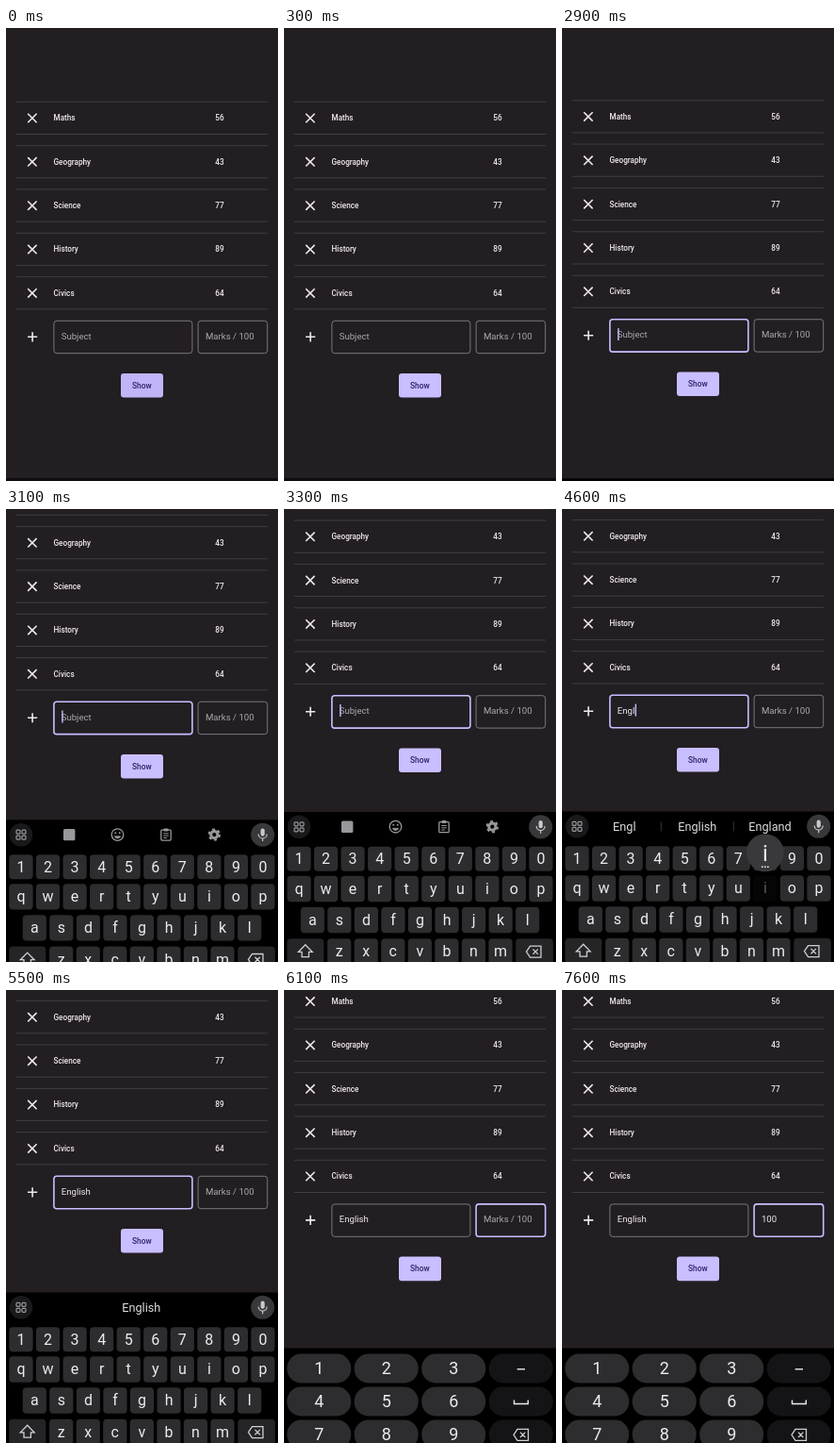
Animation, 289 px wide and 480 px high, one loop 8000 ms. Source, as an HTML page:

```html
<!DOCTYPE html>
<html lang="en">
<head>
<meta charset="utf-8">
<title>Marks entry</title>
<style>
  html, body { margin: 0; width: 100%; height: 100%; overflow: hidden; background: #221e22; }
  svg { display: block; width: 100%; height: 100%; font-family: Roboto, "Noto Sans", sans-serif; }
</style>
</head>
<body>
<svg id="stage" viewBox="0 0 289 480"></svg>
<script>
const LOOP = 8000;
const INK = '#efe9ee', HINT = '#aca6ae', ACCENT = '#c9beff', LINE = '#7c767e';
const KEY = '#2d2d2f', MOD = '#252527', ICON = '#98989b';
const NS = 'http://www.w3.org/2000/svg';
const stage = document.getElementById('stage');

function add(parent, tag, attrs, content) {
  const el = document.createElementNS(NS, tag);
  set(el, attrs);
  if (content !== undefined) el.textContent = content;
  parent.appendChild(el);
  return el;
}

function set(el, attrs) {
  for (const name in attrs) el.setAttribute(name, attrs[name]);
}

const group = parent => add(parent, 'g', {});
const show = (el, on) => set(el, { display: on ? 'inline' : 'none' });

// Text whose capitals are centred on cy
function label(parent, text, x, cy, size, attrs) {
  return add(parent, 'text', { x, y: cy + size * 0.355, 'font-size': size, fill: INK, ...attrs }, text);
}

const centred = { 'text-anchor': 'middle' };

function box(parent, x, y, width, height, rx, attrs) {
  return add(parent, 'rect', { x, y, width, height, rx, ...attrs });
}

function path(parent, d, stroke, width, attrs) {
  return add(parent, 'path', { d, stroke, 'stroke-width': width, fill: 'none', ...attrs });
}

// ---- Form ----
box(stage, 0, 0, 289, 480, 0, { fill: '#221e22' });
box(stage, 0, 477, 289, 3, 0, { fill: '#110c11' });
const form = group(stage);

const marks = [['Maths', 56], ['Geography', 43], ['Science', 77], ['History', 89], ['Civics', 64]];
marks.forEach(([name, mark], i) => {
  const y = 95.5 + i * 46.35;
  path(form, `M11 ${y - 17.2}H278M11 ${y + 17}H278`, '#413d42', 1);
  path(form, `M23.2 ${y - 4.7}l9.4 9.4m0 -9.4l-9.4 9.4`, INK, 1.6);
  label(form, name, 50.5, y, 8.2, { 'font-weight': 500 });
  label(form, mark, 227, y, 8.2, { ...centred, 'font-weight': 500 });
});
path(form, 'M23 327.3H33.2M28.1 322.2V332.4', INK, 1.6);

function makeField(x, width, hint) {
  const frame = box(form, x + 0.5, 310.3, width - 1, 34.4, 3, { fill: 'none' });
  const text = label(form, '', x + 8.3, 326.2, 9.65);
  const caret = box(form, 0, 319.6, 1.4, 13, 0, { fill: ACCENT });
  return { frame, text, caret, x: x + 8.3, hint };
}

const subject = makeField(50.4, 148, 'Subject');
const score = makeField(203.6, 74.6, 'Marks / 100');

function drawField(field, value, focused, caretOn) {
  set(field.frame, { stroke: focused ? ACCENT : LINE, 'stroke-width': focused ? 1.6 : 1 });
  field.text.textContent = value || field.hint;
  set(field.text, { fill: value ? INK : HINT });
  show(field.caret, focused && caretOn);
  const end = value ? field.text.getComputedTextLength() + 0.4 : 0.5;
  set(field.caret, { x: field.x + end });
}

box(form, 122, 366, 45, 25.6, 3, { fill: ACCENT });
const press = box(form, 122, 366, 45, 25.6, 3, { fill: '#30206a' });
label(form, 'Show', 144.4, 378.8, 8.4, { ...centred, fill: '#30206a', 'font-weight': 500 });

// ---- Letter keyboard ----
const board = group(stage);
box(board, 0, 320.5, 289, 200, 0, { fill: '#000' });
add(board, 'circle', { cx: 16, cy: 336.3, r: 12.3, fill: '#19191b' });
for (const [x, y] of [[11, 331.3], [17, 331.3], [11, 337.3], [17, 337.3]]) {
  box(board, x, y, 4, 4, 1, { fill: 'none', stroke: ICON, 'stroke-width': 1.2 });
}
add(board, 'circle', { cx: 272.7, cy: 336.3, r: 12.5, fill: '#38383a' });
box(board, 270.6, 329.6, 4.2, 8.2, 2.1, { fill: '#c8c8ca' });
path(board, 'M268.2 335.6a4.5 4.5 0 0 0 9 0M272.7 340.2V343.2', '#c8c8ca', 1.2);

const tools = group(board);
box(tools, 61, 330, 12.4, 12.4, 1.5, { fill: ICON });
add(tools, 'circle', { cx: 118.5, cy: 336.2, r: 6.3, fill: 'none', stroke: ICON, 'stroke-width': 1.3 });
path(tools, 'M115.2 337.8a3.5 3.5 0 0 0 6.6 0z', ICON, 0.6, { fill: ICON });
for (const x of [116.3, 120.7]) add(tools, 'circle', { cx: x, cy: 334.3, r: 1, fill: ICON });
box(tools, 164.8, 331.2, 10.4, 11, 1, { fill: 'none', stroke: ICON, 'stroke-width': 1.3 });
path(tools, 'M167.2 335H172.8M167.2 337.3H172.8M167.2 339.6H171', ICON, 1);
box(tools, 167.5, 329.6, 5, 3, 0.8, { fill: ICON });
add(tools, 'circle', { cx: 221.3, cy: 336.2, r: 3.6, fill: 'none', stroke: ICON, 'stroke-width': 3 });
add(tools, 'circle', { cx: 221.3, cy: 336.2, r: 5.6, fill: 'none', stroke: ICON, 'stroke-width': 2.2,
  'stroke-dasharray': '2.93 2.93' });

const bar = group(board);
const dividers = path(bar, 'M105.3 331.5V341.5M182.3 331.5V341.5', '#363638', 1);
const words = [66.3, 143.8, 221].map(x => label(bar, '', x, 336.2, 12.7, { ...centred, fill: '#dedee0' }));

const keys = {};
function keyRow(chars, shifted, x, cy, height) {
  [...chars].forEach((low, i) => {
    const cx = x + i * 28.55;
    const cap = box(board, cx - 12.6, cy - height / 2, 25.2, height, 4, { fill: KEY });
    const text = label(board, low, cx, cy - 0.3, 16, centred);
    keys[low] = { cx, cy, cap, text, low, up: shifted[i] };
  });
}
keyRow('1234567890', '!@#$%^&*()', 16, 370.3, 26);
keyRow('qwertyuiop', 'QWERTYUIOP', 16, 402, 27.4);
keyRow('asdfghjkl', 'ASDFGHJKL', 30.3, 435, 27.4);
keyRow('zxcvbnm', 'ZXCVBNM', 58.7, 468.4, 27.4);

function backspace(parent, cx, cy) {
  path(parent, `M${cx - 8} ${cy}l4 -6h11.5v12h-11.5zM${cx - 1} ${cy - 2.7}l5.4 5.4m0 -5.4l-5.4 5.4`, '#d0d0d2', 1.3);
}
const shiftCap = box(board, 3.3, 454.7, 39, 27.4, 4, { fill: MOD });
const shiftArrow = path(board, 'M22.7 461.2l7.4 7.6h-3.7v5.4h-7.4v-5.4h-3.7z', '#d0d0d2', 1.3);
box(board, 246.3, 454.7, 39.6, 27.4, 4, { fill: MOD });
backspace(board, 265.5, 468.6);

const popup = group(board);
add(popup, 'circle', { cx: 0, cy: 0, r: 20, fill: '#39393c' });
const popupText = label(popup, '', 0, 0, 24, centred);
for (const x of [-3, 0, 3]) add(popup, 'circle', { cx: x, cy: 15, r: 0.9, fill: INK });

// ---- Number pad ----
const pad = group(stage);
box(pad, 0, 379.5, 289, 101, 0, { fill: '#000' });
const padCaps = [];
for (let row = 0; row < 3; row++) {
  const cy = 401 + row * 35;
  for (let col = 0; col < 4; col++) {
    const cx = 37.2 + col * 71.5;
    padCaps.push(box(pad, cx - 34, cy - 15.5, 68, 31, 15, { fill: col < 3 ? KEY : '#141416' }));
    if (col < 3) label(pad, row * 3 + col + 1, cx, cy, 18, centred);
  }
}
path(pad, 'M247.7 401.8H256', INK, 1.4);
path(pad, 'M244.5 434.5V438.5H259.3V434.5', INK, 1.4);
backspace(pad, 252, 471.3);

// ---- Timeline ----
const FOCUS = 2900, SWITCH = 5700, SETTLED = 5800;
// key, pressed, released
const taps = [['e', 4000, 4100], ['n', 4200, 4300], ['g', 4300, 4400], ['l', 4500, 4600],
  ['i', 4600, 4700], ['s', 4800, 4900], ['h', 4900, 5000]];
const digits = [['1', 6700], ['0', 6900], ['0', 7100]];
const guesses = [[], ['E', 'Even', 'Every'], ['En', 'End', 'Enter'], ['Eng', 'English', 'England'],
  ['Engl', 'English', 'England'], ['Engli', 'English', 'England'], ['Englis', 'English', 'England'],
  ['', 'English', '']];

const decay = (t, tau) => Math.exp(-(t - FOCUS) / tau);

function scrollAt(t) {
  if (t < FOCUS) return 0;
  if (t < SWITCH) return 113 * (1 - decay(t, 72));
  return t < SETTLED ? 98 : 83.4;
}

// The caret toggles every 500 ms, counted from the latest edit
function caretAt(t) {
  const starts = t < SWITCH ? [FOCUS, ...taps.map(tap => tap[2])] : [5600, ...digits.map(d => d[1])];
  const start = Math.max(...starts.filter(s => s <= t), 0);
  return Math.floor((t - start) / 500) % 2 === 0;
}

function drawBoard(t, typed) {
  const visible = t >= FOCUS && t < SWITCH;
  show(board, visible);
  if (!visible) return;
  set(board, { transform: `translate(0 ${159.5 * decay(t, 69.6)})` });

  const upper = t >= 3800 && t < 4100;
  const tap = taps.find(([, from, to]) => t >= from && t < to);
  for (const key of Object.values(keys)) {
    const down = tap && tap[0] === key.low;
    key.text.textContent = upper ? key.up : key.low;
    set(key.text, { fill: down ? '#58585a' : INK });
    set(key.cap, { fill: down ? '#050505' : KEY });
  }
  set(shiftCap, { fill: t >= 3700 && t < 3800 ? '#48484b' : MOD });
  set(shiftArrow, { fill: upper ? '#d0d0d2' : 'none' });

  show(popup, !!tap);
  if (tap) {
    const key = keys[tap[0]];
    set(popup, { transform: `translate(${key.cx} ${key.cy - 37.8})` });
    popupText.textContent = upper ? key.up : key.low;
  }

  show(tools, !typed);
  show(bar, typed > 0);
  show(dividers, typed < taps.length);
  words.forEach((word, i) => { word.textContent = guesses[typed][i] || ''; });
}

function render(t) {
  const typed = taps.filter(tap => t >= tap[2]).length;
  const total = digits.filter(d => t >= d[1]).map(d => d[0]).join('');
  const caret = caretAt(t);

  set(form, { transform: `translate(0 ${-scrollAt(t)})` });
  set(press, { opacity: 0.05 * Math.min(1, Math.max(0, (300 - t) / 200)) });
  drawField(subject, 'English'.slice(0, typed), t >= FOCUS && t < SWITCH, caret);
  drawField(score, total, t >= SWITCH, caret);
  drawBoard(t, typed);

  show(pad, t >= SWITCH);
  set(padCaps[0], { fill: t >= 6600 && t < 6800 ? '#4a4a4d' : KEY });
}

const start = performance.now();
function tick() {
  render((performance.now() - start) % LOOP);
  requestAnimationFrame(tick);
}
tick();
</script>
</body>
</html>
```
